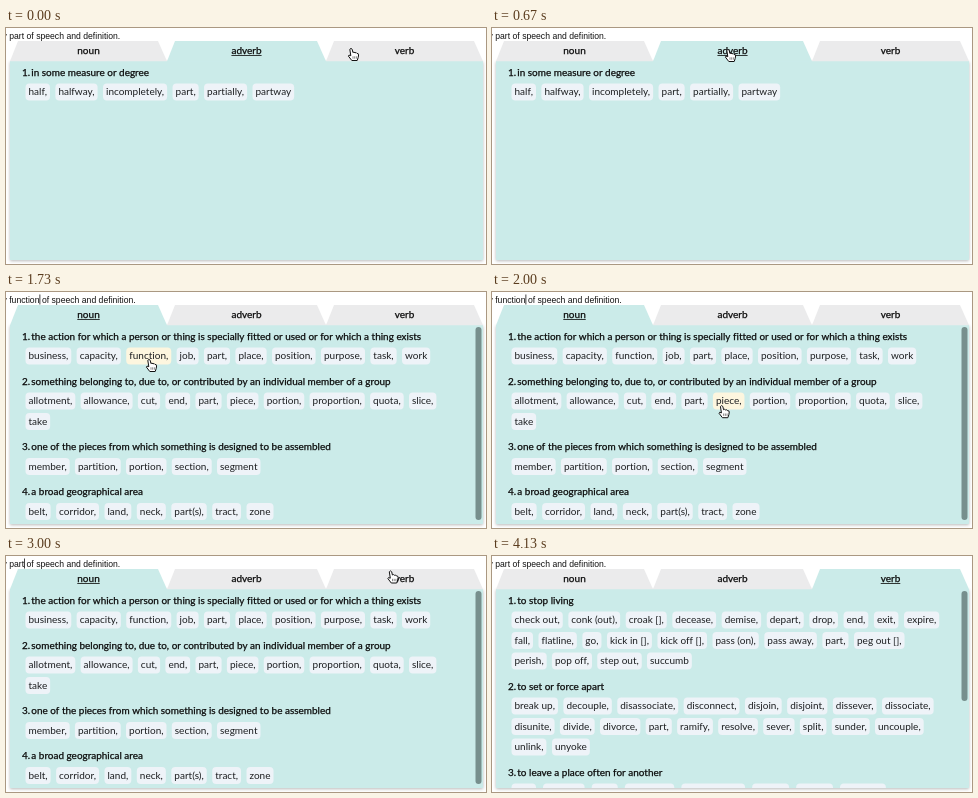
An HTML page with a canvas for the animation above (4.79 s loop, 480 by 236 pixels).

```html
<!DOCTYPE html>
<html lang="en">
<head>
<meta charset="utf-8">
<title>Thesaurus tabs</title>
<style>
html, body { margin: 0; width: 100%; height: 100%; overflow: hidden; background: #fff; }
canvas { display: block; width: 480px; height: 236px; }
</style>
</head>
<body>
<canvas id="stage"></canvas>
<script>
const W = 480, H = 236, LOOP = 4790;
const TEAL = '#cbebe9', GREY = '#ebebec', CHIP = '#eef3f8', HOVER = '#fdf6df';
const LATO = 'Lato, "Open Sans", sans-serif';
const ARIAL = '8.64px "Liberation Sans", Arial, sans-serif';

const canvas = document.getElementById('stage');
const ctx = canvas.getContext('2d');
const scale = window.devicePixelRatio || 1;
canvas.width = W * scale;
canvas.height = H * scale;
ctx.letterSpacing = '0.01px'; // turns ligatures off

// Each row: x of its last word, then the words.
const panels = {
  adverb: { bar: 0, sections: [
    ['1. in some measure or degree',
      [249.5, 'half, halfway, incompletely, part, partially, partway']]
  ] },
  noun: { bar: 193, sections: [
    ['1. the action for which a person or thing is specially fitted or used or for which a thing exists',
      [399, 'business, capacity, function, job, part, place, position, purpose, task, work']],
    ['2. something belonging to, due to, or contributed by an individual member of a group',
      [406, 'allotment, allowance, cut, end, part, piece, portion, proportion, quota, slice,'],
      [22.5, 'take']],
    ['3. one of the pieces from which something is designed to be assembled',
      [214, 'member, partition, portion, section, segment']],
    ['4. a broad geographical area',
      [243.5, 'belt, corridor, land, neck, part(s), tract, zone']]
  ] },
  verb: { bar: 110, sections: [
    ['1. to stop living',
      [415, 'check out, conk (out), croak [], decease, demise, depart, drop, end, exit, expire,'],
      [365, 'fall, flatline, go, kick in [], kick off [], pass (on), pass away, part, peg out [],'],
      [158, 'perish, pop off, step out, succumb']],
    ['2. to set or force apart',
      [393, 'break up, decouple, disassociate, disconnect, disjoin, disjoint, dissever, dissociate,'],
      [386, 'disunite, divide, divorce, part, ramify, resolve, sever, split, sunder, uncouple,'],
      [63, 'unlink, unyoke']],
    ['3. to leave a place often for another',
      [351, 'exit, pull out, part, withdraw, take leave of, depart, vacate, set forth,']]
  ] }
};

const tabs = [['noun', 4, 161], ['adverb', 161, 320], ['verb', 320, 477]];

// Pointer tip: time, x, y
const path = [
  [0, 345, 20.5], [150, 366, 20], [270, 366, 20], [500, 239, 21], [670, 236, 21.5],
  [700, 236, 21.5], [940, 128, 21], [1100, 128, 21], [1340, 143, 67.5], [1780, 143, 67.5],
  [2030, 233, 115.5], [2400, 233, 115.5], [2530, 205, 114], [2660, 205, 114],
  [2940, 384.5, 15], [3240, 384.5, 15], [3470, 368, 17.5]
];
const tabTimes = [[0, 'adverb'], [200, 'verb'], [530, 'adverb'], [1000, 'noun'], [3130, 'verb']];
const wordTimes = [[0, 'part'], [1470, 'function'], [2070, 'piece'], [2600, 'part']];
const CARET_ON = 1470, CARET_OFF = 3130, POINTER_OFF = 4000;

const stateAt = (list, t) => list.filter(e => e[0] <= t).pop()[1];

function pointerAt(t) {
  const i = path.findIndex(p => p[0] > t);
  if (i < 0) return path[path.length - 1].slice(1);
  const [t0, x0, y0] = path[i - 1], [t1, x1, y1] = path[i];
  const u = (t - t0) / (t1 - t0), e = u * u * (3 - 2 * u);
  return [x0 + (x1 - x0) * e, y0 + (y1 - y0) * e];
}

function text(str, x, y, color) {
  ctx.fillStyle = color;
  ctx.fillText(str, x, y);
}

function boldText(str, x, y, color) {
  text(str, x, y, color);
  ctx.strokeStyle = color;
  ctx.lineWidth = 0.25;
  ctx.strokeText(str, x, y);
}

function box(x, y, w, h, r, color) {
  ctx.fillStyle = color;
  ctx.beginPath();
  ctx.roundRect(x, y, w, h, r);
  ctx.fill();
}

function drawSentence(t) {
  ctx.font = ARIAL;
  const word = stateAt(wordTimes, t), x = 3.2;
  const end = x + ctx.measureText(word).width;
  text('y ', x - ctx.measureText('y ').width, 10.6, '#111');
  text(word + ' of speech and definition.', x, 10.6, '#111');
  if (t >= CARET_ON && t < CARET_OFF) {
    ctx.fillStyle = '#111';
    ctx.fillRect(end, 2.5, 0.8, 10);
  }
}

function drawTabs(active) {
  ctx.font = '10px ' + LATO;
  for (const [name, l, r] of tabs) {
    ctx.fillStyle = name === active ? TEAL : GREY;
    ctx.beginPath();
    ctx.moveTo(l, 33.2);
    ctx.lineTo(l + 8, 13);
    ctx.lineTo(r - 9, 13);
    ctx.lineTo(r, 33.2);
    ctx.fill();
    const w = ctx.measureText(name).width, x = (l + r) / 2 - w / 2;
    boldText(name, x, 25.8, '#0a0a0a');
    if (name === active) ctx.fillRect(x, 27, w, 0.8);
  }
}

function drawTitle(title, y) {
  ctx.font = '9.95px ' + LATO;
  const [number, body] = title.split(/ (.*)/);
  boldText(number, 16, y + 3.2, '#0a0a0a');
  boldText(body, 25.3, y + 3.2, '#0a0a0a');
}

function drawRow([last, list], y, tip) {
  ctx.font = '10px ' + LATO;
  const words = list.split(/(?<=,) /);
  const widths = words.map(w => ctx.measureText(w).width);
  const used = widths.slice(0, -1).reduce((a, b) => a + b, 0);
  const gap = words.length > 1 ? (last - 22.5 - used) / (words.length - 1) : 12;
  let x = 22.5;
  words.forEach((word, i) => {
    const l = x - 3, w = widths[i] + 6;
    const over = tip && Math.abs(tip[1] - y) < 8.5 && tip[0] > l && tip[0] < l + w;
    box(l, y - 8.5, w, 17, 4, over ? HOVER : CHIP);
    text(word, x, y + 3.2, '#1c1e20');
    x += widths[i] + gap;
  });
}

function drawPanel(active, tip) {
  const { bar, sections } = panels[active];
  ctx.save();
  ctx.shadowColor = 'rgba(0,0,0,.28)';
  ctx.shadowBlur = 3 * scale;
  ctx.shadowOffsetY = scale;
  ctx.fillStyle = TEAL;
  ctx.fillRect(4, 33, 473, 199);
  ctx.restore();
  drawTabs(active);

  ctx.save();
  ctx.beginPath();
  ctx.rect(4, 33, 473, 199);
  ctx.clip();
  let y = 44.5;
  for (const [title, ...rows] of sections) {
    drawTitle(title, y);
    y += 19.5;
    for (const row of rows) {
      drawRow(row, y, tip);
      y += 20.5;
    }
    y += 5;
  }
  if (bar) box(469.5, 35, 6, bar, 3, '#778f8d');
  ctx.restore();
}

function drawHand([x, y]) {
  ctx.save();
  ctx.translate(x, y);
  ctx.beginPath();
  ctx.moveTo(-1.2, 0.8);
  ctx.quadraticCurveTo(0, -1, 1.2, 0.8);
  ctx.lineTo(1.9, 4);
  ctx.quadraticCurveTo(3, 3, 4, 4.3);
  ctx.quadraticCurveTo(5.3, 3.5, 6, 5);
  ctx.quadraticCurveTo(7.5, 4.6, 7.6, 6.4);
  ctx.lineTo(7.2, 9);
  ctx.lineTo(6.2, 12);
  ctx.lineTo(0.8, 12);
  ctx.lineTo(-2.6, 7.6);
  ctx.quadraticCurveTo(-2.6, 5.8, -0.2, 7.2);
  ctx.closePath();
  ctx.fillStyle = '#fff';
  ctx.fill();
  ctx.strokeStyle = '#111';
  ctx.lineWidth = 1;
  ctx.lineJoin = 'round';
  ctx.stroke();
  ctx.beginPath();
  for (const fx of [2, 3.7, 5.4]) {
    ctx.moveTo(fx, 7.8);
    ctx.lineTo(fx, 10.2);
  }
  ctx.lineWidth = 0.5;
  ctx.stroke();
  ctx.restore();
}

function draw(t) {
  ctx.setTransform(scale, 0, 0, scale, 0, 0);
  ctx.fillStyle = '#fff';
  ctx.fillRect(0, 0, W, H);
  const tip = t < POINTER_OFF ? pointerAt(t) : null;
  drawPanel(stateAt(tabTimes, t), tip);
  drawSentence(t);
  if (tip) drawHand(tip);
}

const start = performance.now();
function frame() {
  draw((performance.now() - start) % LOOP);
  requestAnimationFrame(frame);
}
frame();
</script>
</body>
</html>
```
